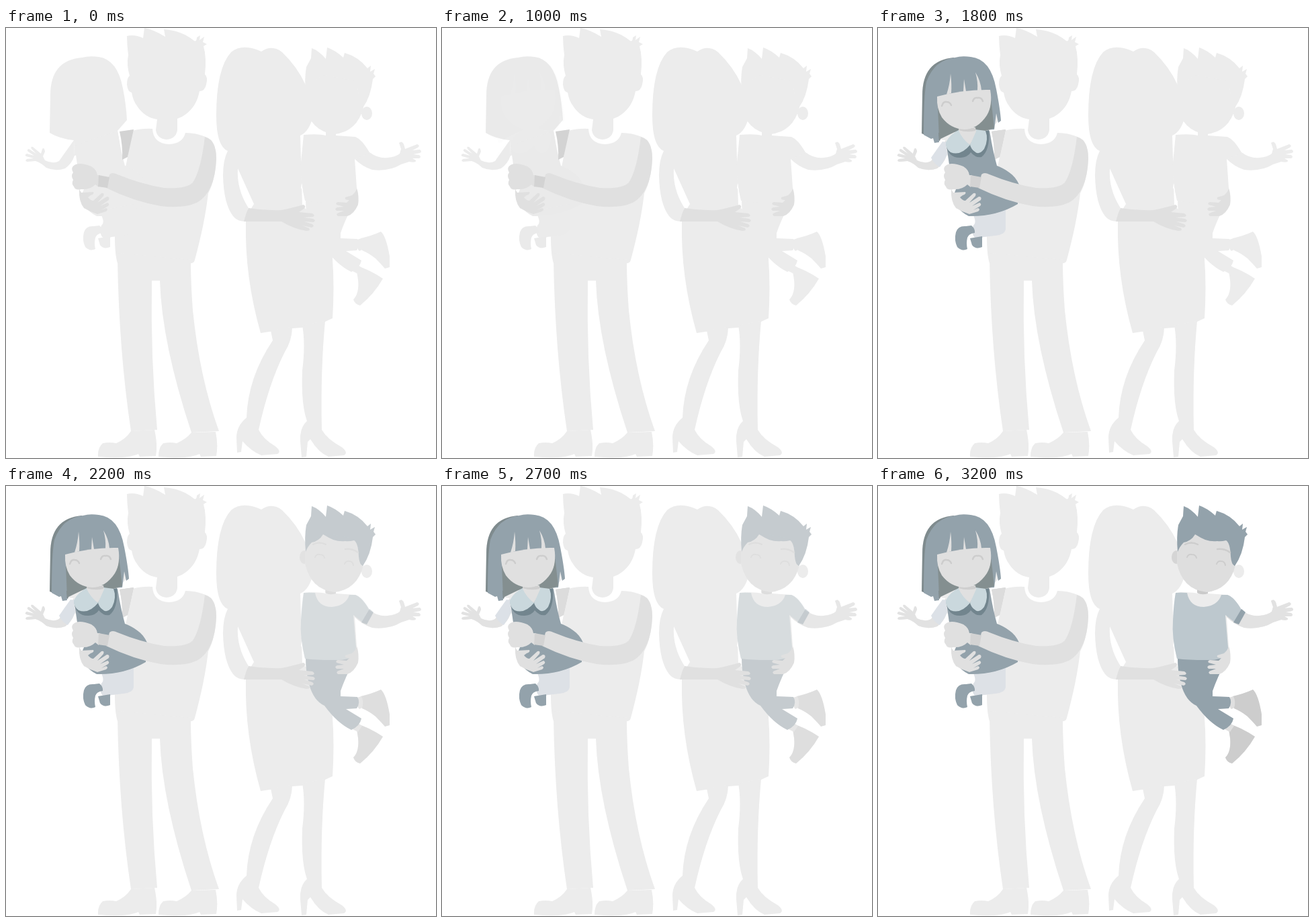
These frames come from a looping animation (640 by 640 pixels, 4.8 s). An HTML page with a canvas:

```html
<!DOCTYPE html>
<html lang="en">
<head>
<meta charset="utf-8">
<title>Family</title>
<style>
html, body { margin: 0; width: 100%; height: 100%; overflow: hidden; background: #fff; }
canvas { display: block; width: 640px; height: 640px; }
</style>
</head>
<body>
<canvas id="stage" width="640" height="640"></canvas>
<script>
const LOOP = 4800, STEP = 100, SIZE = 640;
const PALE = '#ececec', SKIN = '#e0e0e0', LIMB = '#e2e2e2', LINE = '#cdcdcd';
const BLUE = '#93a2ab', DEEP = '#72858e';
const ctx = document.getElementById('stage').getContext('2d');

// Opacity of each child in 100 ms steps: a double flash that settles at 1
const flashes = {
  girl: { start: 800, levels: [.76, .15, .01, .01, .6, .98, .43, .05, .35, .94, 1] },
  boy: { start: 2200, levels: [.43, .05, .05, .84, .98, .43, .05, .05, .84, .95, 1] }
};

const girlArm = 'M101 167Q88 185 79 198Q70 203 58 197L55 191L58 184Q57 177 54 180L52 187L40 177Q36 176 38 180L45 187L34 180Q30 181 33 184L42 190L31 187Q27 189 30 191L41 194L31 195Q27 198 32 199L44 198Q50 200 54 203L60 208Q74 214 88 209Q98 202 102 190Z';
const boyArm = 'M520 162Q530 166 541 185Q555 195 568 193Q580 192 586 187L588 180L585 171Q589 167 592 173L594 180L612 173Q617 175 613 178L605 182L616 181Q620 184 616 186L606 188L615 189Q619 192 615 194L605 194L610 197Q611 201 600 199L588 203Q570 214 545 211Q530 206 519 195Z';
const girlBoot = 'M131 295L139 294Q145 299 144 305Q135 306 133 312Q131 320 133 329Q125 333 118 326Q113 316 116 304Q119 294 131 295Z';
const girlFoot = 'M137 313L155 310L155 326Q145 330 140 323Z';
const girlLeg = 'M140 272L190 262L190 300Q188 308 175 309L157 311Q148 315 143 311Q138 302 142 294Q146 290 144 284Z';
const girlDress = 'M102 175L166 153Q171 184 177 205C188 209 204 218 210 233L208 262Q176 281 135 280Q115 270 112 250L118 235L106 203Z';
const shoulder = 'M169 154L190 151L181 192L173 196Q174 175 169 154Z';
const boyHair = 'M446 98Q444 75 447 58L454 45L455 30Q466 34 476 46L478 29Q490 33 502 44L504 37Q525 43 538 60L543 56L542 65L549 61L547 68L550 72L546 76Q543 102 531 119Q526 117 525 105Q524 84 518 81Q510 83 505 82Q496 83 487 80Q480 77 472 72Q466 82 455 84Q449 90 446 98Z';
const boyFace = 'M445 98Q449 88 456 82L472 70L522 79Q525 108 532 118Q523 154 489 158Q453 154 445 115Z';
const boyPants = 'M446 256Q490 261 515 252L517 262Q505 285 498 305L498 313L523 314Q528 322 522 331L506 332L529 346Q527 357 514 363Q493 353 474 327Q458 320 451 295Q446 277 446 256Z';
const boyShoes = 'M528 313Q545 309 558 303Q566 310 571 340L571 356L564 358Q557 350 550 343Q540 335 530 331ZM522 354Q540 359 561 373Q548 396 527 413Q519 411 517 404Q526 395 524 375L522 362Z';
const boyAnkles = 'M523 315L529 313Q533 321 530 330L526 332Q522 330 523 315ZM516 362L524 353L530 357L524 366Z';

const base = layer(c => {
  // father
  fill(c, PALE, 'M180 12Q191 9 204 15L206 0Q219 2 237 13L235 2Q262 4 280 19Q284 21 284 14L289 11L288 18L295 13L293 21L299 24L294 27Q299 45 296 69Q301 73 298 84Q296 94 288 94Q284 116 268 128Q262 133 255 135L255 152Q253 165 239 166Q225 165 223 152L225 136Q206 133 195 116Q189 108 187 96Q181 95 180 84Q180 74 184 71Q179 55 182 40Q180 26 180 12Z');
  fill(c, PALE, 'M188 153Q204 149 218 150Q219 172 243 173Q263 172 267 156Q283 156 297 162Q312 167 313 193Q312 225 301 246Q296 290 281 345Q280 351 273 350L166 350Q162 338 162 310L165 270L181 192Z');
  fill(c, PALE, 'M166 335L275 345Q275 380 278 420Q288 520 317 600L276 602Q232 470 229 376L217 376Q215 490 225 598L186 600Q168 480 166 345Z');
  fill(c, PALE, 'M186 600L221 598Q226 620 223 637L199 638L197 634Q180 642 137 638Q136 625 144 618Q154 616 164 618Q178 612 186 600Z');
  fill(c, PALE, 'M276 602L312 601Q316 620 313 637L290 638L288 634Q272 642 227 638Q227 624 234 618Q245 616 254 618Q268 612 276 602Z');
  // girl
  fill(c, PALE, 'M65 156L66 100Q66 48 113 44Q124 41 138 43Q166 47 174 90Q179 115 180 137L166 153L169 170L102 190L101 167Q80 165 65 156Z');
  for (const d of [girlDress, girlLeg, girlBoot, girlFoot, girlArm]) fill(c, PALE, d);
  fill(c, '#d3d3d3', shoulder);
  // mother
  fill(c, PALE, 'M313 130Q313 60 335 36Q352 22 380 35Q396 24 411 36Q434 58 446 85L456 97L456 135Q450 155 438 160L441 265L486 300L486 345Q489 385 486 432L473 438L440 446L426 447L379 454Q355 370 357 288L361 275L369 262L345 209Q343 240 361 268L355 288Q343 287 338 280Q324 262 323 220Q323 196 330 183Q313 176 313 130Z');
  fill(c, PALE, 'M394 450L397 465Q360 520 358 580Q343 592 343 610L344 632L350 631L352 615Q365 630 380 636L404 634Q411 630 400 622Q383 612 376 598Q391 530 414 484Q426 465 426 445Z');
  fill(c, PALE, 'M441 443Q446 470 441 510Q439 560 448 585Q437 595 438 615L440 639L447 638L449 616L453 612Q465 632 480 638L503 636Q510 632 500 624Q478 612 470 598Q468 510 475 436Z');
  // boy
  for (const d of [boyHair, boyFace, boyPants, boyShoes, boyAnkles, boyArm]) fill(c, PALE, d);
  oval(c, PALE, 537, 127, 8, 10);
  fill(c, PALE, 'M443 159Q465 157 476 160L476 152L491 152L491 160L520 162L541 186L519 195L522 238L520 256Q480 264 445 257Q437 225 439 200Z');
  fill(c, '#fff', 'M440 231L442 243L439 238Z');
});

const girl = layer(c => {
  fill(c, '#dcdcdc', shoulder);
  fill(c, LIMB, girlArm);
  fill(c, '#dde1e6', girlLeg);
  fill(c, BLUE, girlBoot);
  fill(c, BLUE, girlFoot);
  fill(c, '#7f8b8e', 'M65 157L66 100Q66 48 113 44L120 80L92 168Z');
  fill(c, BLUE, 'M68 159Q68 100 72 80Q84 47 115 44Q124 41 138 43Q168 46 176 91Q182 122 183 138L179 141L176 127L173 151L90 156L91 170L84 171L82 164L79 165Z');
  fill(c, '#848f90', 'M89 118L91 166L120 152L160 153L173 149L168 104Z');
  fill(c, BLUE, girlDress);
  fill(c, DEEP, 'M101 172Q104 194 123 193Q134 192 138 185Q146 194 154 192Q167 182 165 152L150 155Z');
  fill(c, '#dce1e7', 'M96 169Q88 180 79 193Q84 203 92 207Q98 199 103 188L101 170Z');
  fill(c, '#cad8dd', 'M122 151Q108 157 101 170Q100 179 108 185Q123 191 137 174ZM145 151L160 153Q165 166 158 180Q150 190 144 184Q139 181 137 174Z');
  fill(c, SKIN, 'M121 148L145 148L146 154L137 174Q126 166 120 153Z');
  fill(c, '#cfcfcf', 'M120 149L145 149L145 153Q132 156 120 152Z');
  fill(c, SKIN, 'M88 102Q128 91 167 92Q171 115 162 130Q148 151 128 151Q108 150 95 133Q87 120 88 102Z');
  fill(c, SKIN, 'M102 99Q107 84 108 68Q110 84 109 97ZM127 95L128 76L131 94ZM148 93Q149 80 145 66Q153 79 154 93Z');
  line(c, 'M95 116Q97 109 102 110Q107 110 109 115M141 109Q143 103 148 104Q154 103 156 109', 2.5);
});

const fatherArm = layer(c => {
  fill(c, SKIN, 'M104 203Q112 200 127 206Q135 211 136 219L140 219L138 237L133 233Q125 241 112 240Q103 242 101 236Q97 232 100 226Q96 220 100 215Q95 207 104 203Z');
  fill(c, SKIN, 'M109 240L112 245L130 244Q132 247 126 249L122 252Q126 257 130 257L142 246Q147 245 145 250L136 260L150 251Q155 251 153 256L140 265L151 260Q155 262 152 265L142 271L149 268Q153 270 149 273L136 277Q126 274 116 268Q108 258 109 240Z');
  fill(c, SKIN, 'M298 163Q313 167 313 195Q311 245 284 260Q264 269 230 265Q190 258 149 238L154 218Q158 214 166 218Q200 232 235 238Q268 240 278 230Q290 212 296 162Z');
  fill(c, '#d3d3d3', 'M138 219L154 222L151 238L137 236Z');
});

const boy = layer(c => {
  fill(c, LIMB, boyArm);
  oval(c, '#d5d5d5', 444, 106, 7, 10);
  fill(c, '#cdcdcd', boyShoes);
  fill(c, '#dfdfdf', boyAnkles);
  fill(c, BLUE, boyPants);
  fill(c, '#bdc8ce', 'M443 159Q450 158 460 159Q464 180 485 180Q506 178 511 162L520 162Q530 165 541 184L531 203L517 192L521 240L520 252Q509 260 487 259Q461 259 445 257Q437 225 439 200Q440 175 443 159Z');
  fill(c, BLUE, 'M541 183L547 188L537 206L529 203Z');
  fill(c, '#cacaca', 'M475 154L491 154L491 160Q482 163 475 159Z');
  fill(c, '#dedede', boyFace);
  fill(c, BLUE, boyHair);
  line(c, 'M460 106Q462 101 467 102Q473 102 474 107M504 116Q506 111 511 112Q516 112 517 118', 2);
  line(c, 'M457 87Q466 82 476 87M505 94Q516 93 524 99', 2.5);
});

const motherHands = layer(c => {
  fill(c, SKIN, 'M361 268Q385 272 410 271Q425 268 443 263Q448 266 442 270L436 274L456 276Q461 279 457 281L443 282L457 284Q462 286 458 289L444 288L456 292Q460 295 455 297L441 294L451 298Q454 302 447 302Q428 299 410 288L354 288Q357 276 361 268Z');
  fill(c, SKIN, 'M522 238Q526 250 524 263Q518 277 508 280L494 280Q490 277 495 275L503 272L492 272Q488 269 493 267L503 266L492 263Q490 260 494 259L507 260L511 256Q503 256 505 252L515 249Q521 244 522 238Z');
});

function layer(draw) {
  const c = document.createElement('canvas');
  c.width = c.height = SIZE;
  draw(c.getContext('2d'));
  return c;
}

function fill(c, color, d) {
  c.fillStyle = color;
  c.fill(new Path2D(d));
}

function oval(c, color, x, y, rx, ry) {
  c.fillStyle = color;
  c.beginPath();
  c.ellipse(x, y, rx, ry, 0, 0, Math.PI * 2);
  c.fill();
}

function line(c, d, width) {
  c.strokeStyle = LINE;
  c.lineWidth = width;
  c.lineCap = 'round';
  c.stroke(new Path2D(d));
}

function level({ start, levels }, t) {
  if (t < start) return 0;
  const i = Math.floor((t - start) / STEP);
  return levels[Math.min(i, levels.length - 1)];
}

function put(image, alpha = 1) {
  ctx.globalAlpha = alpha;
  ctx.drawImage(image, 0, 0);
}

function render(t) {
  ctx.globalAlpha = 1;
  ctx.fillStyle = '#fff';
  ctx.fillRect(0, 0, SIZE, SIZE);
  put(base);
  put(girl, level(flashes.girl, t));
  put(fatherArm);
  put(boy, level(flashes.boy, t));
  put(motherHands);
}

const began = performance.now();
function tick() {
  render((performance.now() - began) % LOOP);
  requestAnimationFrame(tick);
}
tick();
</script>
</body>
</html>
```
